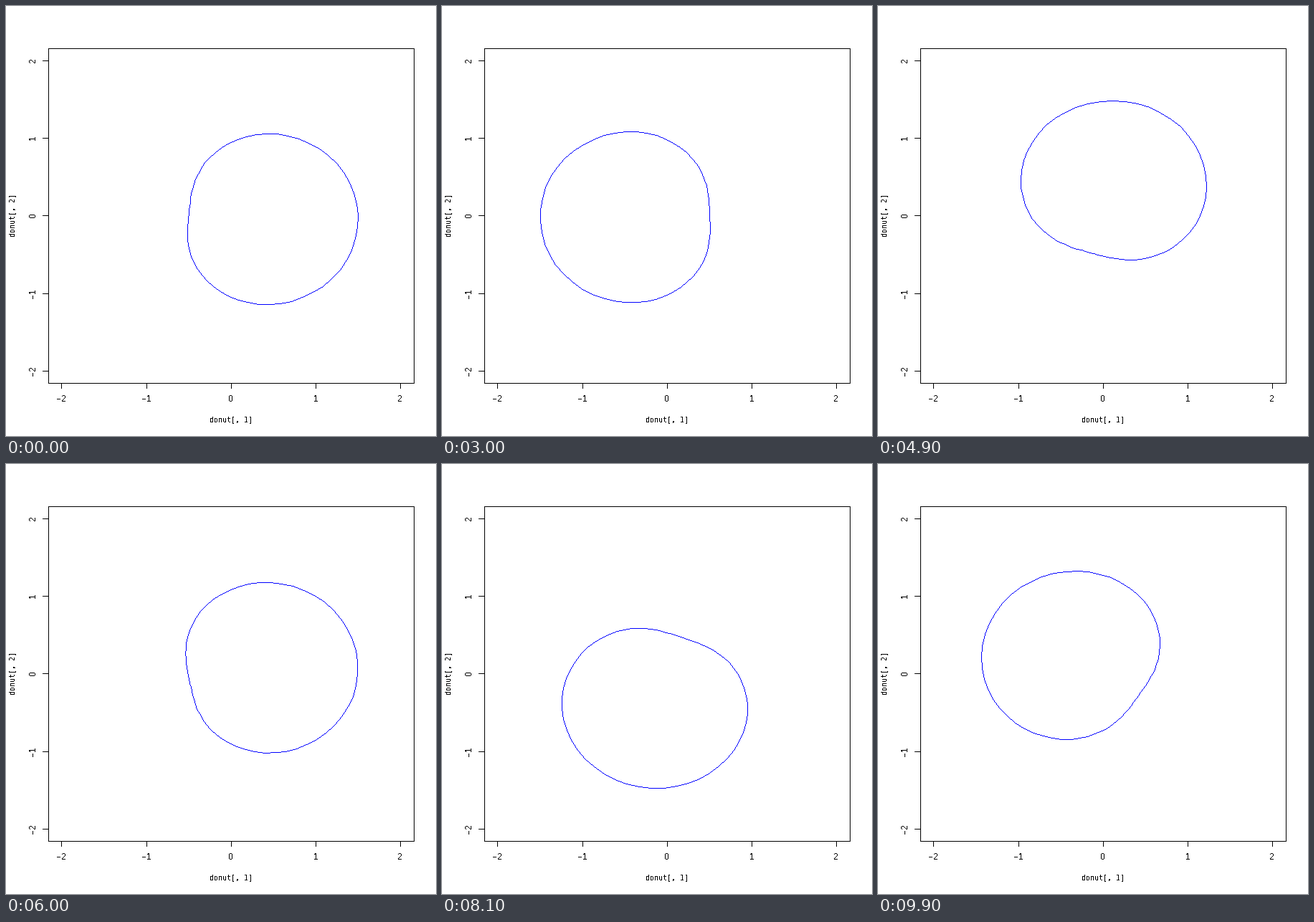
Recreate the animation shown at these times as a matplotlib script. Size 600 by 600 pixels, loop 10 s.

```python
import numpy as np
import matplotlib.pyplot as plt
from matplotlib.animation import FuncAnimation

SIZE, DPI = 600, 100
FRAMES, INTERVAL = 100, 100
PX = 72 / DPI
LINE = 14.4  # height of one margin line in pixels
LEFT, RIGHT = 4.1 * LINE, SIZE - 2.1 * LINE
TOP, BOTTOM = 4.1 * LINE, SIZE - 5.1 * LINE
TICK = LINE / 2
LIMIT = 2.16
BLACK, BLUE = (0, 0, 0), (0, 0, 255)

plt.rcParams["text.antialiased"] = False


def to_px(x, y):
    """Map data coordinates to stage pixels."""
    px = (LEFT + RIGHT) / 2 + x * (RIGHT - LEFT) / (2 * LIMIT)
    py = (TOP + BOTTOM) / 2 - y * (BOTTOM - TOP) / (2 * LIMIT)
    return px, py


def polyline(img, xs, ys, color):
    """Draw a hard-edged line, one pixel wide."""
    pts = np.column_stack([xs, ys]).astype(int)
    for p, q in zip(pts[:-1], pts[1:]):
        n = np.abs(q - p).max() + 1
        x, y = np.floor(np.linspace(p, q, n) + 0.5).astype(int).T
        img[y, x] = color


def label(x, y, text, font, size, rotation=0):
    ax.text(x, y, text, family=font, size=size * PX, color="black",
            ha="center", va="baseline", rotation=rotation,
            rotation_mode="anchor")


fig = plt.figure(figsize=(SIZE / DPI, SIZE / DPI), dpi=DPI, facecolor="white")
ax = fig.add_axes([0, 0, 1, 1])
ax.axis("off")

plot = np.full((SIZE, SIZE, 3), 255, np.uint8)
polyline(plot, [LEFT, RIGHT, RIGHT, LEFT, LEFT],
         [TOP, TOP, BOTTOM, BOTTOM, TOP], BLACK)

for v in range(-2, 3):
    tx, ty = to_px(v, v)
    polyline(plot, [tx, tx], [BOTTOM, BOTTOM + TICK], BLACK)
    polyline(plot, [LEFT, LEFT - TICK], [ty, ty], BLACK)
    text = str(v).replace("-", "\u2212")
    label(int(tx), 552, text, "Liberation Sans", 12)
    label(41, int(ty), text, "Liberation Sans", 12, 90)

label(313.5, 580, "donut[, 1]", "DejaVu Sans Mono", 10)
label(12, 292, "donut[, 2]", "DejaVu Sans Mono", 10, 90)

stage = ax.imshow(plot, extent=(0, SIZE, SIZE, 0), aspect="auto",
                  interpolation="nearest")
theta = np.linspace(0, 2 * np.pi, 64)


def draw(i):
    # Limacon turning clockwise by 0.1 rad per step
    r = 1 + 0.5 * np.cos(theta + 0.1 * (i + 1))
    img = plot.copy()
    polyline(img, *to_px(r * np.cos(theta), r * np.sin(theta)), BLUE)
    stage.set_data(img)
    return stage,


anim = FuncAnimation(fig, draw, frames=FRAMES, interval=INTERVAL,
                     repeat=True, repeat_delay=0, blit=False)
plt.show()
```
